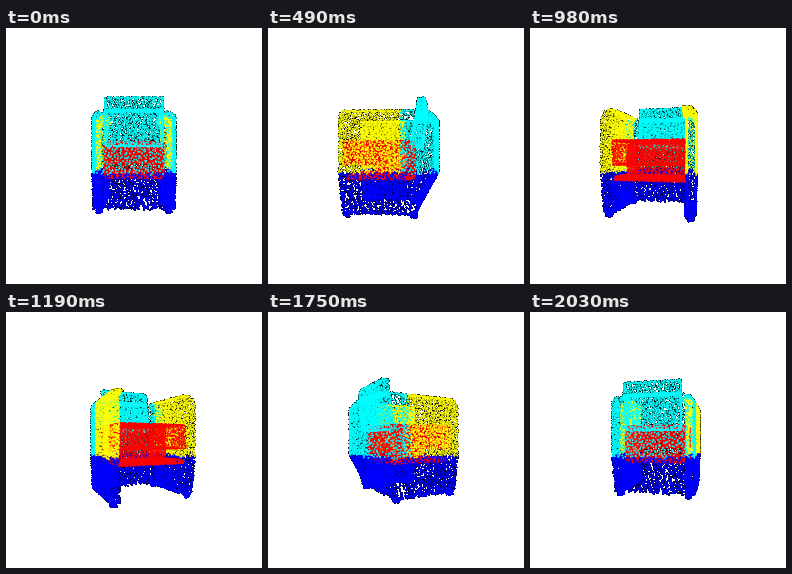
A matplotlib script for the animation above (2100 ms loop, 256 by 256 pixels).

```python
import numpy as np
import matplotlib.pyplot as plt
from matplotlib.animation import FuncAnimation

SIZE, FRAMES, STEP_MS = 256, 30, 70
DIST, FOCAL, RADIUS = 3.0, 128 / np.tan(np.radians(30)), 1.28
DENSITY = 1000
CYAN, YELLOW, BLUE, RED = (0, 1, 1), (1, 1, 0), (0, 0, 1), (1, 0, 0)
rng = np.random.default_rng(5)


def quad(a, b, c, d, density=DENSITY):
    """Evenly scattered points on the bilinear patch a-b-c-d."""
    a, b, c, d = (np.array(p, float) for p in (a, b, c, d))
    area = np.linalg.norm(np.cross(c - a, d - b)) / 2
    n = max(4, round(area * density))
    k = np.arange(n)[:, None]
    uv = k * [0.7548777, 0.5698403] + rng.random(2)
    uv = (uv + rng.normal(0, 0.25 / np.sqrt(n), (n, 2))) % 1
    u, v = uv[:, :1], uv[:, 1:]
    return (1 - v) * ((1 - u) * a + u * b) + v * ((1 - u) * d + u * c)


def box(x, y0, y1, low, high=None, density=DENSITY, x0=None):
    """Box from y0 to y1; low and high are its depth ranges at both ends."""
    high = high or low
    x0 = -x if x0 is None else x0
    p = [[(s, y, q) for s, q in
          ((x0, r[0]), (x, r[0]), (x, r[1]), (x0, r[1]))]
         for y, r in ((y0, low), (y1, high))]
    faces = [quad(*p[0], density), quad(*p[1], density)]
    for i in range(4):
        j = (i + 1) % 4
        faces.append(quad(p[0][i], p[0][j], p[1][j], p[1][i], density))
    return np.vstack(faces)


def arm(s):
    def rim(inset, top_rear, low_rear):
        front, rear, foot = 0.54 - inset, 0.49 - inset, 0.52 - inset
        return ([(s * front, 0.53, -0.6), (s * rear, 0.53, top_rear)],
                [(s * front, -0.2, -0.6), (s * rear, -0.2, top_rear)],
                [(s * foot, -0.66, -0.56), (s * (0.5 - inset), -0.66, low_rear)])

    outer, inner = rim(0, 0.4, 0.28), rim(0.11, 0.14, 0.12)
    parts = []
    for top, mid, low in (outer, inner):
        parts += [quad(*top, *mid[::-1]), quad(*mid, *low[::-1])]
    for k in (0, 2):
        o, i = outer[k], inner[k]
        parts.append(quad(o[0], o[1], i[1], i[0]))
    for k in (0, 1):
        parts.append(quad(outer[k][0], inner[k][0],
                          inner[k + 1][0], outer[k + 1][0]))
    return np.vstack(parts)


def wall():
    """Rear wall, curved outwards in the middle."""
    def band(x0, y0, q0, x1, y1, q1):
        return quad((-x0, y0, q0), (x0, y0, q0), (x1, y1, q1), (-x1, y1, q1))

    outer = np.vstack([band(.49, .53, .4, .49, -.2, .4),
                       band(.49, -.2, .4, .5, -.66, .28)])
    x, y = np.abs(outer[:, 0]), outer[:, 1]
    curve = 1 - np.clip((x - 0.3) / 0.19, 0, 1) ** 2
    fade = np.clip((y + 0.66) / 0.46, 0, 1) * np.clip((0.62 - y) / 0.2, 0, 1)
    outer[:, 2] += 0.14 * curve * fade
    return np.vstack([outer, band(.4, -.2, .3, .4, -.66, .2),
                      band(.4, .53, .3, .4, .53, .45)])


def shell():
    pts = np.vstack([arm(-1), arm(1), wall()])
    bend = np.clip((pts[:, 1] - 0.44) / 0.09, 0, 1) ** 2
    pts[:, 0] *= 1 - 0.12 * bend
    pts[:, 2] *= 1 - 0.04 * bend
    return pts


def shell_colors(pts):
    edge = rng.normal(0, 0.012, (len(pts), 2))
    upper = np.where((pts[:, 2] + edge[:, 0] > 0.1)[:, None], CYAN, YELLOW)
    return np.where((pts[:, 1] + edge[:, 1] < -0.2)[:, None], BLUE, upper)


def build():
    frame = shell()
    back = np.vstack([
        box(0.345, 0.12, 0.55, (0.2, 0.36), (0.28, 0.41)),
        box(0.345, 0.55, 0.7, (0.28, 0.41), (0.3, 0.38)),
    ])
    seat = np.vstack([
        box(0.41, -0.1, 0.18, (-0.59, -0.2)),
        box(0.37, -0.28, 0.18, (-0.2, 0.25)),
        box(0.41, -0.28, -0.24, (-0.55, -0.2)),
    ])
    feet = np.vstack([
        box(s * x + 0.03, -0.7, -0.65, (q - 0.03, q + 0.03),
            density=2200, x0=s * x - 0.03)
        for s in (-1, 1) for x, q in ((0.43, 0.25), (0.47, -0.52))
    ])
    flat = [np.tile(c, (len(p), 1)) for p, c in
            ((back, CYAN), (seat, RED), (feet, BLUE))]
    return (np.vstack([frame, back, seat, feet]),
            np.vstack([shell_colors(frame)] + flat).astype(float))


POINTS, COLORS = build()
OFFSETS = np.array([(i, j) for i in range(-2, 3) for j in range(-2, 3)])


def render(angle):
    """Blend soft discs front to back; only untouched pixels stay white."""
    x, y, q = POINTS.T
    c, s = np.cos(angle), np.sin(angle)
    z = DIST - (q * c - x * s)
    center = np.stack([SIZE / 2 + FOCAL * (x * c + q * s) / z,
                       SIZE / 2 - FOCAL * y / z], 1)
    cell = np.floor(center).astype(int)[:, None] + OFFSETS
    d2 = ((cell + 0.5 - center[:, None]) ** 2).sum(2)
    who, spot = np.nonzero(d2 < RADIUS ** 2)
    alpha = 1 - d2[who, spot] / RADIUS ** 2
    pixel = cell[who, spot] @ [1, SIZE]

    order = np.lexsort((z[who], pixel))
    who, alpha, pixel = who[order], alpha[order], pixel[order]
    clear = np.log(np.maximum(1 - alpha, 1e-6))
    before = np.cumsum(clear) - clear
    _, first, run = np.unique(pixel, return_index=True, return_counts=True)
    weight = alpha * np.exp(before - np.repeat(before[first], run))

    image = np.ones((SIZE * SIZE, 3))
    hit = pixel[first]
    for k in range(3):
        total = np.bincount(pixel, weight * COLORS[who, k], SIZE * SIZE)
        image[hit, k] = total[hit]
    return image.reshape(SIZE, SIZE, 3).clip(0, 1)


fig = plt.figure(figsize=(2.56, 2.56), dpi=100, facecolor="white")
ax = fig.add_axes([0, 0, 1, 1])
ax.axis("off")
view = ax.imshow(render(0), interpolation="nearest", aspect="auto")


def update(i):
    view.set_data(render(2 * np.pi * i / FRAMES))
    return [view]


anim = FuncAnimation(fig, update, frames=FRAMES, interval=STEP_MS,
                     repeat=True, repeat_delay=0)
plt.show()
```
